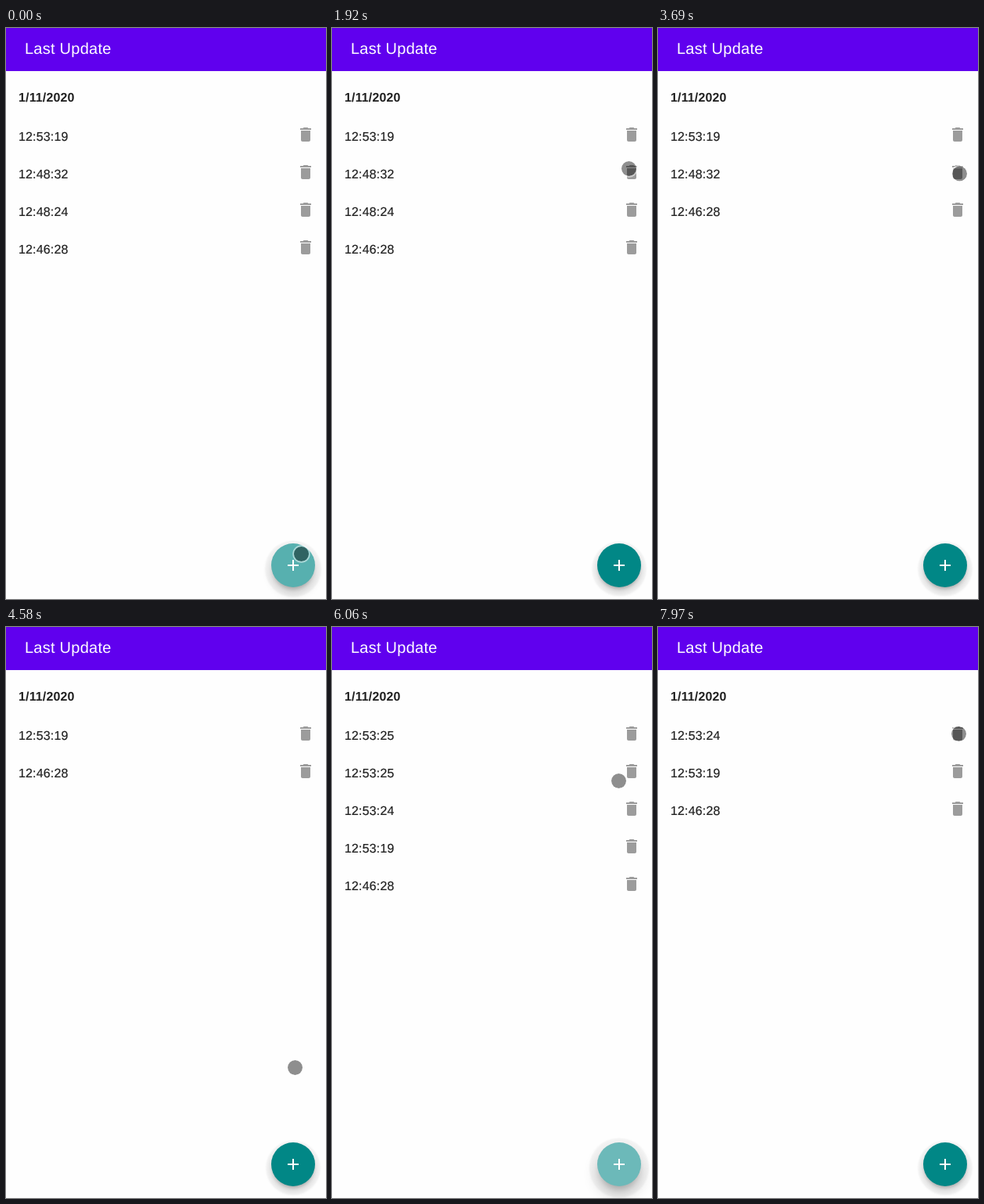
These frames come from a looping animation (409 px wide and 729 px high, 8000 ms). An HTML page:

```html
<!DOCTYPE html>
<html lang="en">
<head>
<meta charset="utf-8">
<title>Last Update</title>
<style>
  html, body { margin: 0; width: 100%; height: 100%; overflow: hidden; background: #fefefe; }
  #stage { position: relative; width: 409px; height: 729px; overflow: hidden; }
  #fab { position: absolute; left: 339px; top: 658px; width: 56px; height: 56px; border-radius: 50%; }
  svg { position: absolute; left: 0; top: 0; }
  text {
    font: 16px "Liberation Sans", Arial, sans-serif; letter-spacing: .15px;
    text-rendering: geometricPrecision; fill: #212121;
  }
  #rows text { stroke: #212121; stroke-width: .2px; }
  .title { font-size: 20px; letter-spacing: .25px; fill: #fff; }
  .date { font-weight: bold; }
</style>
</head>
<body>
<div id="stage">
  <div id="fab"></div>
  <svg width="409" height="729" viewBox="0 0 409 729">
    <defs>
      <path id="bin" fill="#9c9c9c" d="M6 19c0 1.1.9 2 2 2h8c1.1 0 2-.9 2-2V7H6v12zM19 4h-3.5l-1-1h-5l-1 1H5v2h14V4z"/>
    </defs>
    <rect width="409" height="55" fill="#6000ee"/>
    <text class="title" x="24" y="33">Last Update</text>
    <text class="date" x="16" y="94">1/11/2020</text>
    <g id="rows"></g>
    <path transform="translate(355 674)" fill="#fff" d="M19 13h-6v6h-2v-6H5v-2h6V5h2v6h6v2z"/>
    <g id="cursor">
      <circle r="9.5" fill="#000" fill-opacity=".44"/>
      <circle r="10.4" fill="none" stroke="#fff" stroke-opacity=".5" stroke-width="1.6"/>
    </g>
  </svg>
</div>
<script>
const LOOP = 8000, FRAME = 147.5, FIRST = 300, LEAD = 15;
const ROW = 48, BIN_Y = 136;
const $ = id => document.getElementById(id);
const ease = u => u * u * (3 - 2 * u);

const snap = t => FIRST + FRAME * Math.floor((t - FIRST + LEAD) / FRAME);

// Cursor journeys: departure, arrival, destination.
const home = { x: 377.5, y: 671.5 };
const moves = [
  [300, 1030, 354.5, 195.5],
  [1030, 1480, 379.5, 145.5],
  [1780, 1920, 379.5, 179.5],
  [1920, 2800, 378.5, 227.5],
  [2950, 3240, 385.5, 186],
  [4000, 4575, 369.5, 562.5],
  [4575, 4880, 388.5, 690.5],
  [5900, 6050, 366.5, 196.5],
  [6050, 6350, 381, 129.5],
  [6500, 7090, 380.5, 136.5],
  [7530, 7680, 384.5, 136.5]
];
const taps = [300, 1920, 2800, 4130, 5160, 5460, 5900, 7380, 7970];

function cursorAt(t) {
  let { x, y } = home;
  for (const [from, to, toX, toY] of moves) {
    if (t <= from) break;
    const u = ease(Math.min(1, (t - from) / (to - from)));
    x += (toX - x) * u;
    y += (toY - y) * u;
  }
  return { x, y };
}

// A tap acts on whatever lay under the cursor shortly before it.
function stateAt(t) {
  const list = ["53:19", "48:32", "48:24", "46:28"];
  let lit = true, lastAdd = -Infinity;
  for (const tap of taps.filter(time => time <= t)) {
    const { y } = cursorAt(tap - 200);
    lit = y > 600;
    if (lit) {
      list.unshift("53:" + (20 + Math.floor((tap - FIRST) / 1000)));
      lastAdd = tap;
    } else {
      list.splice(Math.round((y - BIN_Y) / ROW), 1);
    }
  }
  return { list, lit, pressed: t - lastAdd < 200 };
}

const row = (time, i) =>
  `<text x="16" y="${144 + ROW * i}">12:${time}</text><use href="#bin" x="371" y="${124 + ROW * i}"/>`;

function paintFab(lit, pressed) {
  const height = pressed ? 12 : lit ? 8 : 6;
  const glow = pressed ? 42 : lit ? 34 : 0;
  const layer = (y, blur, spread, alpha) => `0 ${y}px ${blur}px ${spread}px rgba(0,0,0,${alpha})`;
  $("fab").style.background = `color-mix(in srgb, #fff ${glow}%, #018786)`;
  $("fab").style.boxShadow = [
    layer(height * .6, height * .7, height * -.3, .2),
    layer(height, height * 1.4, (height - 6) / 3, .14),
    layer(4.5, 2, 3.5 + height * .55, .045)
  ].join(",");
}

let shownRows = "";

function render(t) {
  const { list, lit, pressed } = stateAt(t);
  const rows = list.map(row).join("");
  if (rows !== shownRows) $("rows").innerHTML = shownRows = rows;
  paintFab(lit, pressed);
  const { x, y } = cursorAt(t);
  $("cursor").setAttribute("transform", `translate(${x} ${y})`);
}

const start = performance.now();
function tick() {
  render(snap((performance.now() - start) % LOOP));
  requestAnimationFrame(tick);
}
tick();
</script>
</body>
</html>
```
